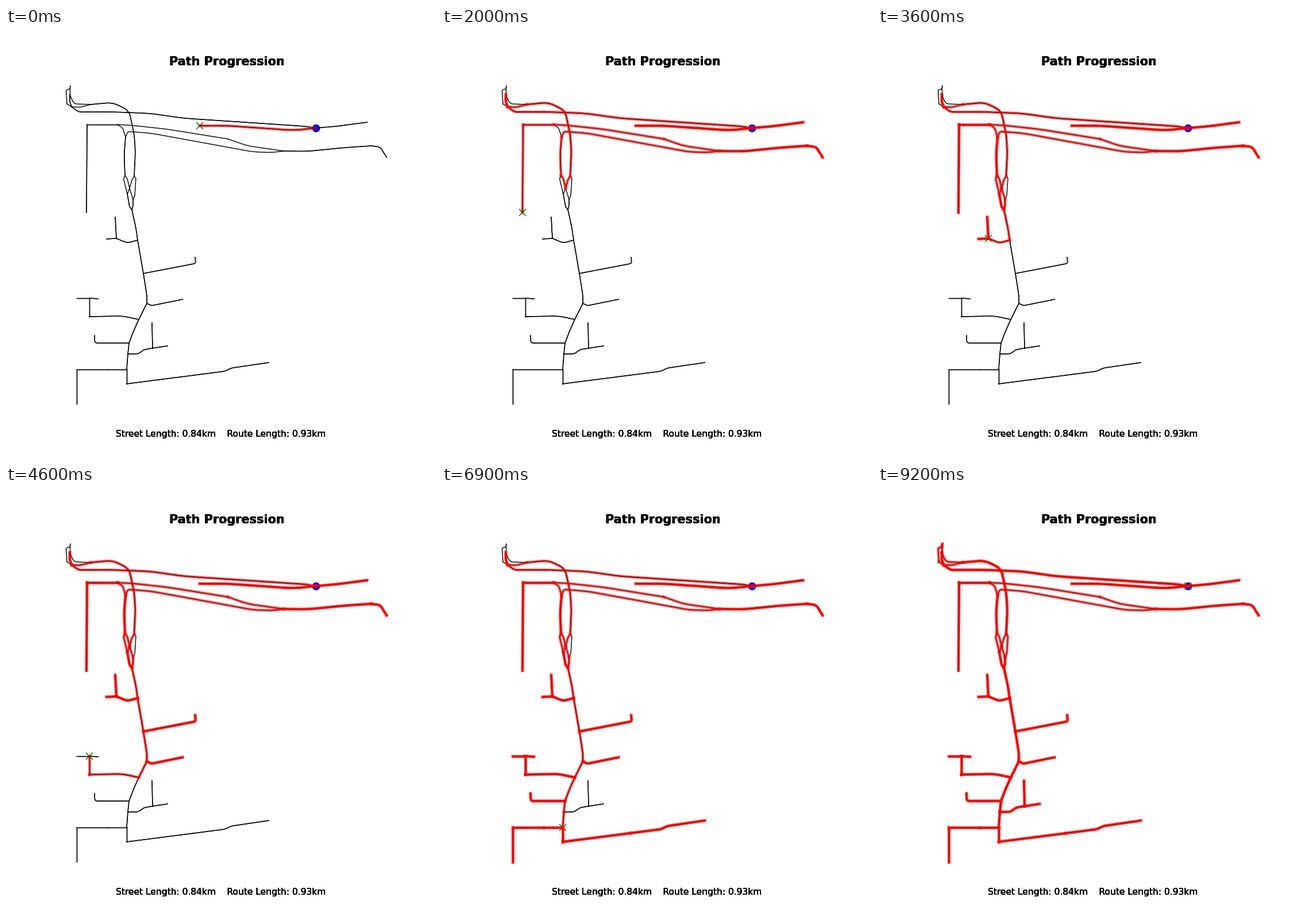
These frames come from a looping animation (748 px wide and 748 px high, 9300 ms). A matplotlib script:

```python
import matplotlib.pyplot as plt
import numpy as np
from matplotlib.animation import FuncAnimation

SIZE = 748

# Junctions and dead ends of the street network, in pixels
NODES = dict(
    a=(539, 174), b=(337, 170), c=(628, 164), d=(114, 137), e=(111, 116),
    f=(148, 133), g=(223, 258), h=(215, 279), i=(207, 257), j=(208, 190),
    k=(483, 214), l=(635, 205), m=(662, 225), n=(386, 193), o=(194, 168),
    p=(141, 168), q=(140, 321), r=(211, 289), s=(219, 316), t=(221, 298),
    u=(229, 369), v=(192, 366), w=(190, 329), x=(175, 367), y=(239, 427),
    z=(329, 399), A=(245, 479), B=(307, 472), C=(231, 507), D=(145, 502),
    E=(145, 470), F=(123, 470), G=(160, 471), H=(214, 548), I=(154, 535),
    J=(212, 567), K=(210, 594), L=(177, 594), M=(123, 594), N=(123, 654),
    O=(210, 619), P=(327, 604), Q=(457, 582), R=(255, 557), T=(254, 513),
    U=(281, 553), V=(111, 106), W=(112, 101), X=(106, 132),
)

# Corners of the streets that are not straight; they get rounded off
CORNERS = dict(
    ab=[(500, 178), (385, 170)], ac=[(575, 171)],
    ad=[(520, 171), (310, 157), (250, 148.5), (185, 146), (126, 146)],
    de=[(111, 128)], df=[(128, 138)], fe=[(118, 132)], VX=[(104.5, 108)],
    fg=[(185, 129.5), (214, 143.5), (223, 185), (225, 215)],
    gh=[(219, 264)], hi=[(211, 262)], ij=[(205.5, 220)], ir=[(204.5, 262)],
    jk=[(212, 180), (252, 183), (430, 215.5), (462, 216.5)],
    kl=[(525, 214.5), (590, 208)], lm=[(651, 207)], kn=[(420, 205)],
    no=[(280, 176), (220, 169.5)], oj=[(203, 174)], rs=[(215, 311)],
    st=[(221, 309)], tg=[(224, 292), (226, 261)], su=[(226, 348)],
    uv=[(211, 374)], yz=[(330, 409.5)], yA=[(245, 465)], AB=[(253, 483)],
    CD=[(203, 501)], CH=[(222, 527)], HI=[(154.5, 548)],
    JR=[(230, 567), (240, 559.5)], PQ=[(381, 597), (392, 591.5)],
)

# The round trip, and the side streets explored on first reaching a junction
LOOP = "adfghijknojirsthrsustgfeVXda"
SIDES = dict(a="bc", d="e", k="l", l="m", o="p", p="q", u="vy", v="wx",
             y="zA", A="BC", C="DH", D="E", E="FG", H="IJ", J="KR", K="LO",
             L="M", M="N", O="P", P="Q", R="TU", V="W")


def explore(node, seen):
    """Visit a node, walking each of its new side streets and back."""
    yield node
    if node not in seen:
        seen.add(node)
        for side in SIDES.get(node, ""):
            yield from explore(side, seen)
            yield node


def street(start, end):
    """Points from one node to the next, with rounded corners."""
    corners = CORNERS.get(start + end) or CORNERS.get(end + start, [])[::-1]
    points = np.array([NODES[start], *corners, NODES[end]], float)
    path = [points[0]]
    for before, corner, after in zip(points, points[1:], points[2:]):
        legs = before - corner, after - corner
        lengths = [np.hypot(*leg) for leg in legs]
        radius = min(0.35 * min(lengths), 15)
        p, q = (corner + leg * radius / n for leg, n in zip(legs, lengths))
        for t in np.linspace(0, 1, 6):
            path.append((1 - t)**2 * p + 2 * t * (1 - t) * corner + t**2 * q)
    path.append(points[-1])
    return np.transpose(path)


def stamp(x, baseline, text, **style):
    """Overprint the text so that its edges are crisp."""
    for _ in range(6):
        ax.text(x, baseline, text, ha="center", va="baseline", **style)


fig = plt.figure(figsize=(10, 10), dpi=SIZE / 10, facecolor="white")
ax = fig.add_axes([0, 0, 1, 1])
ax.set_xlim(0, SIZE)
ax.set_ylim(SIZE, 0)
ax.axis("off")

stamp(384.5, 65, "Path Progression", fontsize=20, fontweight="bold")
stamp(374, 711, "Street Length: 0.84km    Route Length: 0.93km",
      fontsize=14.93)

ax.scatter(*NODES["a"], s=150, c="blue", zorder=1)
cross, = ax.plot([], [], "x", color="green", ms=150 ** 0.5, mew=1.5,
                 zorder=1.5)

seen = set()
route = [node for stop in LOOP for node in explore(stop, seen)]
trail = []
for start, end in zip(route, route[1:]):
    xs, ys = street(start, end)
    ax.plot(xs, ys, color="black", lw=1.35, zorder=2)
    red, = ax.plot(xs, ys, color="red", lw=5, alpha=0.5, zorder=3,
                   solid_capstyle="projecting", visible=False)
    trail.append(red)


def update(step):
    for n, line in enumerate(trail):
        line.set_visible(n <= step)
    x, y = NODES[route[step + 1]]
    cross.set_data([x], [y])
    return [cross, *trail]


anim = FuncAnimation(fig, update, frames=len(trail), interval=100,
                     repeat=True, repeat_delay=0, blit=False)
plt.show()
```
